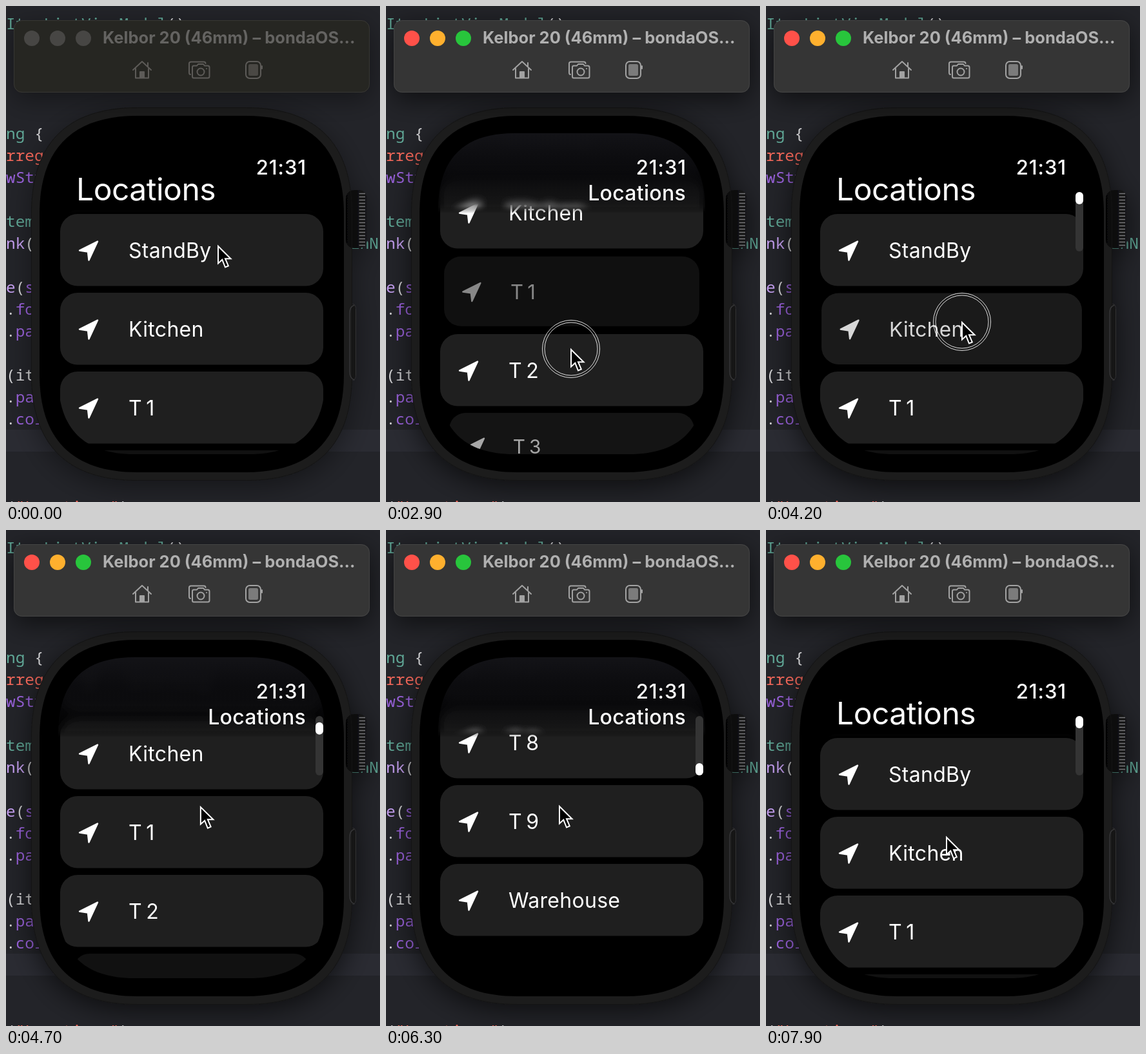
An HTML page that plays this animation: 580x768 px, repeating every 8 s.

```html
<!DOCTYPE html>
<html lang="en">
<head>
<meta charset="utf-8">
<title>Watch list</title>
<style>
html, body { margin: 0; width: 100%; height: 100%; overflow: hidden; background: #212227; }
svg { display: block; width: 580px; height: 768px; font-family: Inter, Roboto, sans-serif; }
.code { font: 500 24.4px "Noto Sans Mono", "DejaVu Sans Mono", monospace; }
.label { font-size: 32px; letter-spacing: .3px; word-spacing: -3px; fill: #fff; }
.idle { --bar: #282624; --ink: #646361; --icon: #5d5b58; --red: #474644; --amber: #474644; --green: #474644; --dim: .4; }
.active { --bar: #353535; --ink: #b0b0b0; --icon: #a2a2a2; --red: #ff5149; --amber: #ffb02e; --green: #28c53c; --dim: .6; }
</style>
</head>
<body>
<svg id="stage" class="idle" viewBox="0 0 580 768"></svg>
<script>
const stage = document.getElementById('stage');
const LOOP = 8000, PITCH = 122, FIRST = 322, MAX = 1147;
const names = ['StandBy', 'Kitchen', ...Array.from({ length: 9 }, (_, i) => 'T ' + (i + 1)), 'Warehouse'];

// Rounded box with continuous corners: e is the corner length
function squircle(x0, y0, x1, y1, e) {
  const k = e * 0.335;
  return `M${x0 + e} ${y0}H${x1 - e}C${x1 - k} ${y0} ${x1} ${y0 + k} ${x1} ${y0 + e}` +
    `V${y1 - e}C${x1} ${y1 - k} ${x1 - k} ${y1} ${x1 - e} ${y1}` +
    `H${x0 + e}C${x0 + k} ${y1} ${x0} ${y1 - k} ${x0} ${y1 - e}` +
    `V${y0 + e}C${x0} ${y0 + k} ${x0 + k} ${y0} ${x0 + e} ${y0}Z`;
}

// One entry per editor row; each part is a colour key and its text
const ink = { g: '#60a897', w: '#d2d2d4', r: '#f5685a', p: '#9a62dc', l: '#c6a0f2' };
const rows = ['gItemListViewModel|w()', , , , , 'gng|w {', 'rrreg', 'pwSty', , 'gtem', 'lnk|w(', ,
  'le|w(|ps', 'w.|pfo', 'w.|ppa', , 'w(it', 'w.|ppa', 'w.|pcol', , , , 'w(|r"Locations"|w)'];
const codeLine = (row, y, x = 0) => `<text class="code" x="${x}" y="${36 + 34 * y}" xml:space="preserve">` +
  row.split('|').map(p => `<tspan fill="${ink[p[0]]}">${p.slice(1)}</tspan>`).join('') + '</text>';
const code = rows.map((row, y) => codeLine(row, y)).join('') + codeLine('ginN', 10, 534);

const card = name => `<g>
  <rect x="84" width="408" height="111.5" rx="27" fill="#1f1f1f"/>
  <path d="M142 42.5L114 56.5L127 58.5L128.5 71.5Z" fill="#fff" stroke="#fff" stroke-width="2.4" stroke-linejoin="round"/>
  <text class="label" x="190" y="68">${name}</text></g>`;

const ridges = Array.from({ length: 17 }, (_, i) => `M547.5 ${290.5 + i * 5}h9.5`).join('');

// Vertical mask over the top of the screen, from (y, opacity) stops
const fade = (id, ...stops) => `
  <linearGradient id="${id}" gradientUnits="userSpaceOnUse" x1="0" x2="0" y1="200" y2="325">
    ${stops.map(([y, o]) => `<stop offset="${(y - 200) / 125}" stop-color="#fff" stop-opacity="${o}"/>`).join('')}
  </linearGradient>
  <mask id="${id}Mask" maskUnits="userSpaceOnUse" x="0" y="0" width="580" height="768">
    <rect width="580" height="768" fill="url(#${id})"/>
  </mask>`;

const lamp = (name, i) => `<circle cx="${40 + 40 * i}" cy="50" r="12" style="fill:var(--${name})"/>`;

stage.innerHTML = `
<defs>
  <clipPath id="screen"><path d="${squircle(81, 197, 495, 694, 118)}"/></clipPath>
  ${fade('sharp', [306, 0], [321, 1])}
  ${fade('soft', [240, .1], [285, .75], [310, .9], [321, 0])}
  <linearGradient id="haze" x1="0" x2="0" y1="0" y2="1">
    <stop offset="0" stop-color="#131317"/>
    <stop offset=".55" stop-color="#0b0b0e" stop-opacity=".7"/>
    <stop offset="1" stop-color="#0b0b0e" stop-opacity="0"/>
  </linearGradient>
  <linearGradient id="knob">
    <stop offset="0" stop-color="#050505"/><stop offset="1" stop-color="#1a1a1b"/>
  </linearGradient>
  <filter id="blur" filterUnits="userSpaceOnUse" x="60" y="150" width="460" height="220"><feGaussianBlur stdDeviation="7"/></filter>
  <filter id="shade" filterUnits="userSpaceOnUse" x="-60" y="-60" width="700" height="900">
    <feDropShadow dx="0" dy="10" stdDeviation="20" flood-color="#000" style="flood-opacity:var(--dim)"/>
  </filter>
</defs>
<rect width="580" height="768" fill="#232429"/>
<rect y="656" width="580" height="34" fill="#2a2b32"/>
${code}
<g filter="url(#shade)">
  <rect x="532.5" y="461.5" width="10" height="118" rx="7" fill="#161617" stroke="#303032"/>
  <path d="${squircle(39, 157, 537, 735, 165)}" fill="#1c1c1c"/>
  <rect x="527" y="285" width="33" height="90" rx="13" fill="url(#knob)"/>
  <path d="${ridges}" stroke="#77777a" stroke-width="1.4"/>
</g>
<path d="${squircle(39.5, 157.5, 536.5, 734.5, 164)}" fill="none" stroke="#141414"/>
<path d="${squircle(52, 170, 524, 722, 152)}" fill="#000"/>
<path d="M540.5 463Q533 465 533 476V566Q533 577 540.5 579" fill="none" stroke="#38383a" stroke-width="1.3"/>
<g clip-path="url(#screen)">
  <g mask="url(#softMask)"><use href="#list" filter="url(#blur)"/></g>
  <rect id="header" x="81" y="197" width="414" height="123" fill="url(#haze)"/>
  <g mask="url(#sharpMask)"><g id="list">${names.map(card).join('')}</g></g>
  <text id="big" x="109" font-size="48" letter-spacing="-.5" fill="#fff">Locations</text>
</g>
<text id="small" class="label" x="465" y="301" text-anchor="end" font-weight="500">Locations</text>
<text x="466" y="261" text-anchor="end" font-size="31" font-weight="500" letter-spacing=".9" fill="#fff">21:31</text>
<g id="scroll">
  <rect x="480" y="288" width="12" height="92" rx="6" fill="#343434"/>
  <rect id="thumb" x="480" width="12" height="19" rx="6" fill="#fff"/>
</g>
<rect x="12" y="22" width="552" height="112" rx="13" style="fill:var(--bar)" filter="url(#shade)"/>
<rect x="12.5" y="22.5" width="551" height="111" rx="12.5" fill="none" stroke="#fff" stroke-opacity=".08"/>
${['red', 'amber', 'green'].map(lamp).join('')}
<text x="150" y="58" font-size="25.5" font-weight="700" style="fill:var(--ink)">Kelbor 20 (46mm) – bondaOS...</text>
<g fill="none" stroke-width="2" stroke-linecap="round" stroke-linejoin="round" style="stroke:var(--icon)">
  <path d="M197 99L211 86L225 99M201 97V111.5H221V97M220 93V88"/>
  <path d="M208 111V102H214V111" style="fill:var(--icon)"/>
  <path d="M286 106Q284 106 284 103V89Q284 86.5 287 86.5H307Q309.5 86.5 309.5 89"/>
  <path d="M291 92.5H296L298 90H306L308 92.5H313Q315.5 92.5 315.5 95V109Q315.5 111.5 313 111.5H291Q289 111.5 289 109V95Q289 92.5 291 92.5Z"/>
  <circle cx="302" cy="102" r="5.5"/><path d="M311 97h.1M397 93v4"/>
  <rect x="372" y="86" width="23" height="26" rx="6"/>
  <rect x="376" y="90" width="15" height="18" rx="2.5" stroke="none" style="fill:var(--icon);opacity:.65"/>
</g>
<g id="pointer">
  <g id="touch" fill="none" stroke="#fff" stroke-opacity=".85"><circle r="44.5"/><circle r="41"/></g>
  <path d="M0 1V27.5L6.3 21.8L11 33.5L15.8 31.4L11 20.2H19.5Z" fill="#000" stroke="#fff" stroke-width="2"/>
</g>`;

// Key points: time, then values; motion eases in and out between them
const cursor = [[0, 329, 371], [100, 318, 343], [400, 318, 343], [1000, 268, 465], [1500, 263, 361],
  [1800, 262, 284], [2900, 287, 531], [4200, 304, 489], [5300, 299, 348], [6300, 269, 427], [7900, 280, 475]];
const travel = [[1200, 0], [1745, 180], [3000, 180], [3400, 0], [4300, 0], [6040, MAX], [6600, MAX], [7500, 0]];
const touches = [[1000, 1800], [2600, 3400], [4100, 4700], [6600, 6900]];
const presses = [[1, 1300], [2, 2900], [1, 4400]]; // card, time of deepest press

const clamp = v => Math.max(0, Math.min(1, v));
function at(keys, t, col = 1) {
  const i = keys.findIndex(k => k[0] > t);
  if (i < 0) return keys[keys.length - 1][col];
  if (i === 0) return keys[0][col];
  const a = keys[i - 1], b = keys[i], p = (t - a[0]) / (b[0] - a[0]);
  return a[col] + (b[col] - a[col]) * p * p * (3 - 2 * p);
}

const [list, big, small, header, scroll, thumb, pointer, touch] =
  ['list', 'big', 'small', 'header', 'scroll', 'thumb', 'pointer', 'touch'].map(id => document.getElementById(id));

function drawCard(el, i, t, s) {
  const top = FIRST + i * PITCH - s;
  const hidden = top > 700 || top < 80;
  el.style.display = hidden ? 'none' : '';
  if (hidden) return;
  const press = Math.max(...presses.map(([n, peak]) => n === i ? clamp(1 - Math.abs(t - peak) / 300) : 0));
  const depth = Math.max(0, top - 577); // cards shrink and dim near the lower edge
  const k = (1 - .03 * press) * (1 - .0013 * depth);
  el.setAttribute('transform', `translate(${288 * (1 - k)} ${top + 1.7 * press}) scale(${k})`);
  el.setAttribute('opacity', (1 - .47 * press) * Math.max(.55, 1 - .0065 * depth));
}

function draw(t) {
  const s = at(travel, t);
  [...list.children].forEach((el, i) => drawCard(el, i, t, s));
  big.setAttribute('y', 301 - s);
  big.setAttribute('opacity', clamp(1 - s / 45));
  header.setAttribute('opacity', clamp(s / 60));
  const shown = clamp((s - 80) / 75);
  small.style.opacity = shown;
  small.style.filter = shown < 1 ? `blur(${9 * (1 - shown)}px)` : 'none';
  // The scroll bar stays for a moment after the list has moved
  scroll.setAttribute('opacity', clamp(Math.abs(s - at(travel, t - 500)) + Math.abs(s - at(travel, t - 900))));
  thumb.setAttribute('y', 288 + 73 * s / MAX);
  stage.setAttribute('class', t < 500 ? 'idle' : 'active');
  pointer.setAttribute('transform', `translate(${at(cursor, t)} ${at(cursor, t, 2)})`);
  touch.style.display = touches.some(([a, b]) => t >= a && t < b) ? '' : 'none';
}

const start = performance.now();
function tick(now) {
  const t = Math.max(0, now - start) % LOOP;
  draw(Math.floor(t / 100) * 100);
  requestAnimationFrame(tick);
}
draw(0);
requestAnimationFrame(tick);
</script>
</body>
</html>
```
